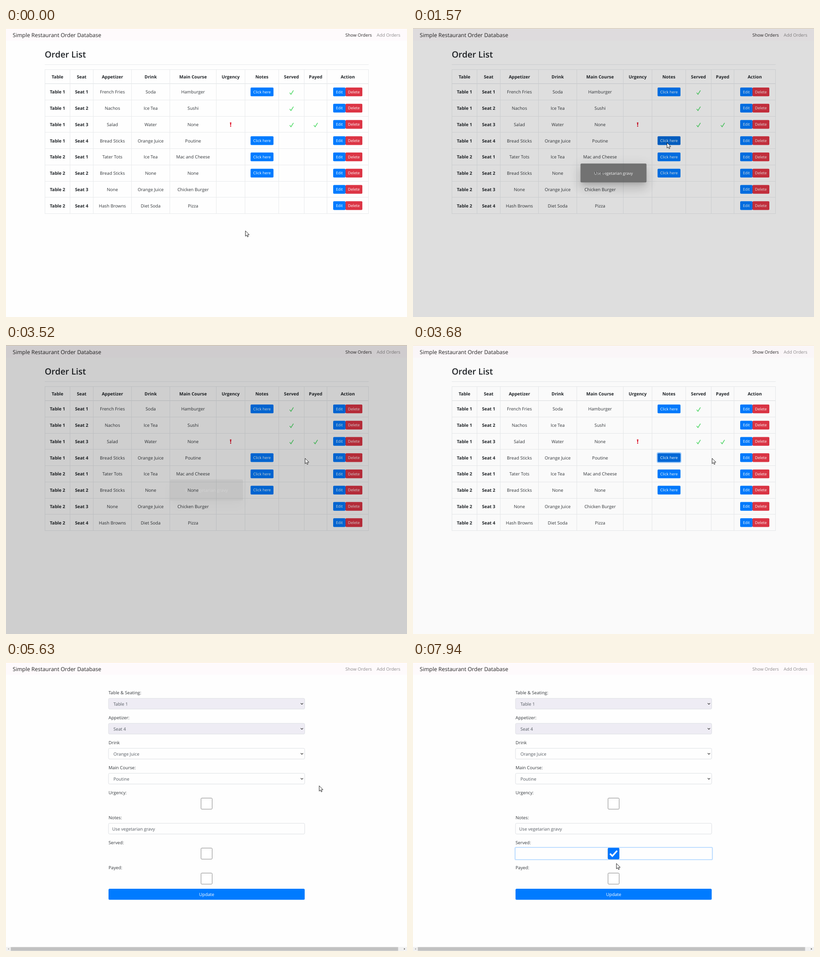
An HTML page that plays this animation: 880x636 px, repeating every 8000 ms.

```html
<!DOCTYPE html>
<html lang="en">
<head>
<meta charset="utf-8">
<title>Restaurant orders</title>
<style>
html, body { margin: 0; width: 100%; height: 100%; overflow: hidden; background: #fefefe; }
body, text { font: 9.7px "Open Sans", "Noto Sans", sans-serif; text-rendering: geometricPrecision; }
svg, #shade { position: absolute; left: 0; top: 0; width: 880px; height: 636px; }
.line { fill: #e8eaec; shape-rendering: crispEdges; }
.hot { filter: brightness(.85); }
#shade { background: #000; }
#dialog {
  position: absolute; left: 360px; top: 296px; width: 160px; height: 46px;
  display: flex; align-items: center; justify-content: center;
  background: #424242; color: #fff; border-radius: 2.5px;
  box-shadow: 0 7px 9px -4px #0003, 0 15px 24px 2px #00000024, 0 6px 29px 5px #0000001f;
}
</style>
</head>
<body>
<svg id="page" viewBox="0 0 880 636"></svg>
<div id="shade"></div>
<div id="dialog">Use vegetarian gravy</div>
<svg viewBox="0 0 880 636"><g id="cursor" stroke-linejoin="round" fill="#fff" stroke="#111">
  <path id="arrow" stroke-width=".9" d="M.4 .4V12.2L3.1 9.7L4.9 13.8L6.8 13L5 9H8.8Z"/>
  <path id="hand" stroke-width="1" d="M-1.3 9V1.2a1.3 1.3 0 0 1 2.6 0V6q1-.9 2 .2q1.2-.6 1.9.4q1.6-.3 1.6 1.2V11.5q0 1.8-1.2 3.2V16H-.8V14.7L-4.4 10q-.6-1.6 1-1.7Z"/>
</g></svg>
<script>
const $ = id => document.getElementById(id);
const LOOP = 8000, OPEN = 1521, CLOSE = 3470, REFOCUS = 3545, FORM = 4990, PRESS = 7470, CHECK = 7630;

// y is the middle of the capitals
const text = (s, x, y, { size = 9.7, weight = 400, fill = '#212529', anchor = 'middle', id = '' } = {}) =>
  `<text id="${id}" x="${x}" y="${y + size * .36}" text-anchor="${anchor}" fill="${fill}"
    style="font-size:${size}px;font-weight:${weight}">${s}</text>`;
const rect = (x, y, w, h, attrs) => `<rect x="${x}" y="${y}" width="${w}" height="${h}" ${attrs}/>`;
const line = (x, y, w, h) => rect(x, y, w, h, 'class="line"');

const buttons = [];
function button(label, x, y, w, fill) {
  buttons.push({ x, y: y - 9.7, w, h: 19.4 });
  return rect(x, y - 9.7, w, 19.4, `rx="2" fill="${fill}" class="btn"`) +
    text(label, x + w / 2, y, { size: 8.55, fill: '#fff' });
}

function listPage() {
  const edges = [85, 140, 191, 275, 359, 461, 524, 598, 654, 704, 795];
  const mid = i => (edges[i] + edges[i + 1] + 1) / 2;
  const heads = 'Table,Seat,Appetizer,Drink,Main Course,Urgency,Notes,Served,Payed,Action'.split(',');
  // flags: u urgent, n notes, s served, p payed
  const orders = [
    'French Fries,Soda,Hamburger,ns', 'Nachos,Ice Tea,Sushi,s', 'Salad,Water,None,usp',
    'Bread Sticks,Orange Juice,Poutine,n', 'Tater Tots,Ice Tea,Mac and Cheese,n',
    'Bread Sticks,None,None,n', 'None,Orange Juice,Chicken Burger,', 'Hash Browns,Diet Soda,Pizza,'];
  const tick = (x, y) =>
    `<path d="M${x - 4} ${y + 1.6}l2.9 3.6l5.4-8.6" fill="none" stroke="#4cd964" stroke-width="1.5"/>`;
  const bold = { weight: 700 };
  let out = text('Order List', 85, 58.5, { size: 18.9, weight: 600, anchor: 'start' }) +
    line(85, 80, 711, 1) + line(85, 91, 711, 1) + rect(85, 122, 711, 1, 'class="line" style="fill:#dcdfe2"');
  edges.forEach(x => out += line(x, 91, 1, 318));
  heads.forEach((s, i) => out += text(s, mid(i), 107.2, bold));
  orders.forEach((order, i) => {
    const [starter, drink, main, flags] = order.split(',');
    const y = 140.8 + 35.75 * i;
    out += line(85, Math.floor(y + 17.6), 711, 1) +
      text('Table ' + (i < 4 ? 1 : 2), mid(0), y, bold) + text('Seat ' + (i % 4 + 1), mid(1), y, bold);
    [starter, drink, main].forEach((s, k) => out += text(s, mid(k + 2), y, { fill: '#33373b' }));
    if (flags.includes('u'))
      out += `<path d="M491.4 ${y - 4.6}h3.2l-.8 6.2h-1.6z" fill="#e0142a"/><circle cx="493" cy="${y + 3.7}" r="1.3" fill="#e0142a"/>`;
    if (flags.includes('n')) out += button('Click here', 536.7, y - .2, 50.3, '#007bff');
    if (flags.includes('s')) out += tick(mid(7), y);
    if (flags.includes('p')) out += tick(mid(8), y);
    out += button('Edit', 718, y - .2, 27, '#007bff') + button('Delete', 745, y - .2, 37, '#dc3545');
  });
  return out + rect(535.7, 237.1, 52.3, 21.4, 'id="ring" rx="3" fill="none" stroke="#268fff80" stroke-width="2"');
}

function formPage() {
  const fields = [['Table &amp; Seating:', 'Table 1'], ['Appetizer:', 'Seat 4'], ['Drink', 'Orange Juice'],
    ['Main Course:', 'Poutine'], ['Urgency:'], ['Notes:', 'Use vegetarian gravy'], ['Served:'], ['Payed:']];
  let out = rect(224, 408, 433, 27, 'id="focus" rx="2" fill="none" stroke="#bfdeff" stroke-width="2.2"');
  fields.forEach(([label, value], i) => {
    const y = 67.4 + 55 * i, select = i < 4;
    out += text(label, 225, y, { anchor: 'start', fill: '#33373b' });
    if (!value) {
      out += rect(428, y + 12.1, 24.4, 24.4, `id="box${i}" rx="1.8" fill="#fff" stroke="#858585"`);
      return;
    }
    out += rect(225, y + 12.6, 430.5, 23.6, `rx="2.5" fill="${i < 2 ? '#eeecf4' : '#fefefe'}" stroke="#dcdfe3"`) +
      text(value, select ? 235.7 : 233, y + 24.8, { anchor: 'start', fill: '#555b62' });
    if (select)
      out += `<path d="M646.7 ${y + 23.2}l2.6 2.6l2.6-2.6" fill="none" stroke="#333" stroke-width="1.3"/>`;
  });
  return out +
    `<g id="mark">${rect(427.6, 409, 25, 25, 'rx="2" fill="#0075ff"')}
      <path d="M432.3 421.8l5.2 5.2l10.4-11.6" fill="none" stroke="#fff" stroke-width="3.4"/></g>` +
    rect(225, 499, 430.5, 24.3, 'rx="2.5" fill="#007bff"') + text('Update', 440.3, 511.5, { fill: '#fff' }) +
    rect(0, 627, 880, 9, 'fill="#f1f1f1"') + rect(10.5, 627.5, 850, 8, 'fill="#c1c1c1"') +
    '<path d="M6.5 629.5v4l-2.4-2z" fill="#a3a3a3"/><path d="M873.5 629.5v4l2.4-2z" fill="#505050"/>';
}

$('page').innerHTML = rect(0, 0, 880, 636, 'fill="#fefefe"') +
  rect(0, 0, 880, 28, 'fill="#fefafc"') + rect(0, 0, 880, 1, 'fill="#fcebc8"') +
  text('Simple Restaurant Order Database', 14.8, 15.4, { size: 12, anchor: 'start', fill: '#222' }) +
  text('Show Orders', 803, 15.2, { anchor: 'end', id: 'show' }) +
  text('Add Orders', 865.4, 15.2, { anchor: 'end', fill: '#8d8b8c' }) +
  `<g id="list">${listPage()}</g><g id="form">${formPage()}</g>`;
const faces = document.querySelectorAll('.btn');
const clickNote = buttons.findIndex(b => b.x < 600 && b.y > 230);

// time, x, y of the pointer tip
const path = [[0, 525, 446], [40, 525, 446], [1310, 557, 252], [2310, 557, 252], [2680, 595, 251.5],
  [3150, 656, 249], [4050, 656, 249], [4520, 726, 247], [4990, 726, 247], [5630, 687, 272],
  [5730, 665, 284], [6570, 462, 412], [7310, 440, 420], [7630, 440, 420], [7890, 446, 443], [LOOP, 446, 443]];

function along(t, axis) {
  const slope = i => path[i + 1] && path[i] ? (path[i + 1][axis] - path[i][axis]) / (path[i + 1][0] - path[i][0]) : 0;
  const tangent = i => {
    const a = slope(i - 1), b = slope(i);
    return a * b > 0 ? 2 * a * b / (a + b) : 0;
  };
  const i = path.findIndex((p, k) => k === path.length - 2 || t < path[k + 1][0]);
  const span = path[i + 1][0] - path[i][0], u = (t - path[i][0]) / span, v = 1 - u;
  return path[i][axis] * v * v * (1 + 2 * u) + path[i + 1][axis] * u * u * (3 - 2 * u) +
    span * u * v * (tangent(i) * v - tangent(i + 1) * u);
}

const clamp = p => Math.min(1, Math.max(0, p));

function bezier(p, x1, y1, x2, y2) {
  if (p <= 0 || p >= 1) return clamp(p);
  const at = (s, a, b) => 3 * s * (1 - s) * (a * (1 - s) + b * s) + s ** 3;
  let lo = 0, hi = 1;
  for (let i = 0; i < 20; i++) {
    const s = (lo + hi) / 2;
    if (at(s, x1, x2) < p) lo = s; else hi = s;
  }
  return at(lo, y1, y2);
}

function draw(t) {
  const x = along(t, 1), y = along(t, 2), onForm = t >= FORM;
  const blocked = onForm || (t >= OPEN && t < CLOSE);
  const over = blocked ? -1 : buttons.findIndex(b => x >= b.x && x < b.x + b.w && y >= b.y && y < b.y + b.h);
  const focused = (t >= OPEN && t < OPEN + 100) || t >= REFOCUS;
  faces.forEach((f, i) => f.classList.toggle('hot', i === over || (i === clickNote && focused)));
  $('ring').style.opacity = clamp((t - REFOCUS) / 150);

  $('list').style.display = onForm ? 'none' : '';
  $('form').style.display = onForm ? '' : 'none';
  $('show').setAttribute('fill', onForm ? '#8d8b8c' : '#2a2829');

  const fade = start => bezier((t - start) / 400, .25, .8, .25, 1);
  const open = bezier((t - OPEN) / 150, 0, 0, .2, 1);
  $('shade').style.opacity = .31 * (fade(OPEN) - fade(CLOSE));
  $('dialog').style.opacity = open * (1 - bezier((t - CLOSE) / 75, .4, 0, .2, 1));
  $('dialog').style.transform = `scale(${.7 + .3 * open})`;

  const hover = x < 656 && y > 408 && y < 435;
  $('box6').setAttribute('stroke', hover ? '#555' : '#858585');
  $('box6').setAttribute('fill', t >= PRESS && t < CHECK ? '#f4f4f4' : '#fff');
  $('mark').style.display = t >= CHECK ? '' : 'none';
  $('focus').style.opacity = clamp((t - CHECK) / 150);

  $('cursor').setAttribute('transform', `translate(${x} ${y})`);
  $('arrow').style.display = over < 0 ? '' : 'none';
  $('hand').style.display = over < 0 ? 'none' : '';
}

function tick() {
  draw(performance.now() % LOOP);
  requestAnimationFrame(tick);
}
tick();
</script>
</body>
</html>
```
